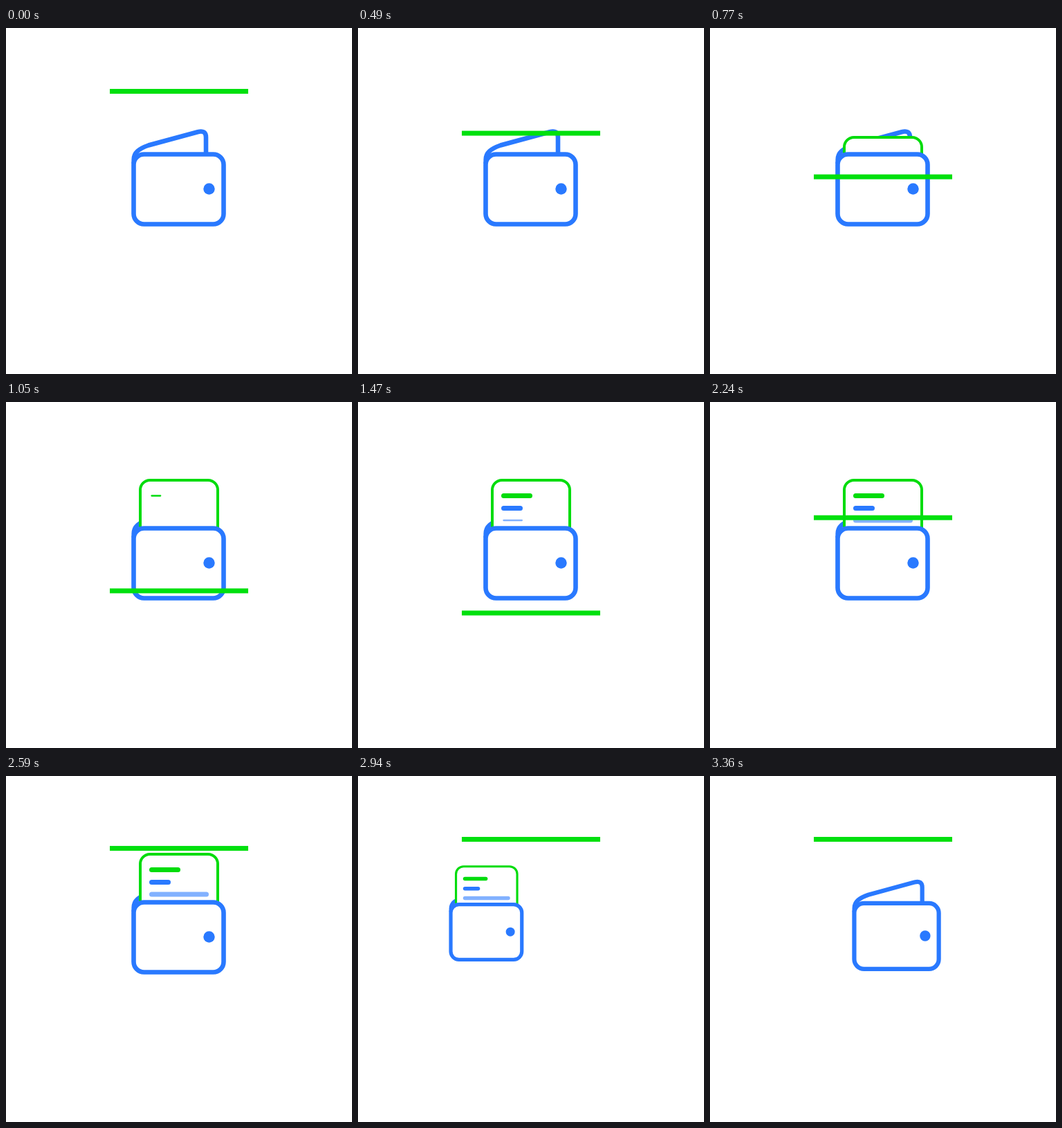
An HTML page that plays this animation: 500 px wide and 500 px high, repeating every 3.43 s.

```html
<!DOCTYPE html>
<html lang="en">
<head>
<meta charset="utf-8">
<title>Wallet scan</title>
<style>
  html, body { margin: 0; width: 100%; height: 100%; overflow: hidden; background: #fff; }
  svg { display: block; width: 100vw; height: 100vh; }
  .blue { fill: #fff; stroke: #2979ff; stroke-width: 6.6; }
  .card { fill: #fff; stroke: #00dc0c; stroke-width: 4; }
  .row { fill: none; stroke-linecap: round; }
</style>
</head>
<body>
<svg viewBox="0 0 500 500">
  <g id="wallet">
    <path class="blue" d="M184.7 196V190C184.7 180 192 174.500 206 169.500L277 150.200Q289 147 289 158V183"/>
    <g id="card">
      <rect class="card" x="194" y="113" width="112" height="90" rx="14"/>
      <path class="row" stroke="#00dc0c"/>
      <path class="row" stroke="#2979ff"/>
      <path class="row" stroke="#82b1ff"/>
    </g>
    <rect class="blue" x="184.500" y="182.500" width="130" height="101" rx="15"/>
    <circle cx="293.500" cy="232.500" r="8.200" fill="#2979ff"/>
  </g>
  <use id="next" href="#fresh"/>
  <rect id="beam" x="150" width="200" height="7" fill="#00e00e"/>
</svg>
<script>
  const STEP = 70, LOOP = 3430;
  const RISE = [630, 980], TRAVEL = 75;
  const LEAVE = [2730, 3080], ENTER = [3080, 3430];
  // y, length, start, end of each line on the card
  const ROWS = [[135.5, 38, 980, 1190], [153.5, 24, 1190, 1400], [171, 79, 1400, 1610]];

  const find = id => document.getElementById(id);
  const wallet = find('wallet'), card = find('card'), beam = find('beam');
  const rows = [...card.querySelectorAll('.row')];

  // The incoming wallet is the same drawing without its card.
  const next = wallet.cloneNode(true);
  next.querySelector('#card').remove();
  next.id = 'fresh';
  find('next').replaceWith(next);

  const part = (t, [a, b]) => Math.min(1, Math.max(0, (t - a) / (b - a)));
  const smooth = p => p * p * (3 - 2 * p);
  const show = (el, on) => el.setAttribute('visibility', on ? 'visible' : 'hidden');
  const place = (el, dx, scale, cy) => el.setAttribute('transform',
    `translate(${250 + dx} ${cy}) scale(${scale}) translate(-250 ${-cy})`);

  function draw(t) {
    const sweep = smooth(Math.max(0, 1 - Math.abs(t - 1400) / 1400));
    beam.setAttribute('y', 88 + 215 * sweep);

    const hidden = 1 - part(t, RISE);
    card.setAttribute('transform', `translate(0 ${TRAVEL * hidden})`);
    card.setAttribute('display', hidden < 1 ? 'inline' : 'none');

    ROWS.forEach(([y, length, from, to], i) => {
      const p = part(t, [from, to]);
      rows[i].setAttribute('d', p ? `M210.5 ${y}h${length * p}` : '');
      rows[i].setAttribute('stroke-width', 7 * p);
    });

    const out = part(t, LEAVE);
    place(wallet, -107 * out, 1 - 0.35 * out, 197.5);
    show(wallet, t <= LEAVE[1]);

    const left = 1 - part(t, ENTER);
    place(next, 100 * left, 1 - 0.3 * left, 207);
    show(next, t >= ENTER[0]);
  }

  const start = performance.now() - 8;
  function tick() {
    const t = (performance.now() - start) % LOOP;
    draw(Math.floor(t / STEP) * STEP);
    requestAnimationFrame(tick);
  }
  tick();
</script>
</body>
</html>
```
